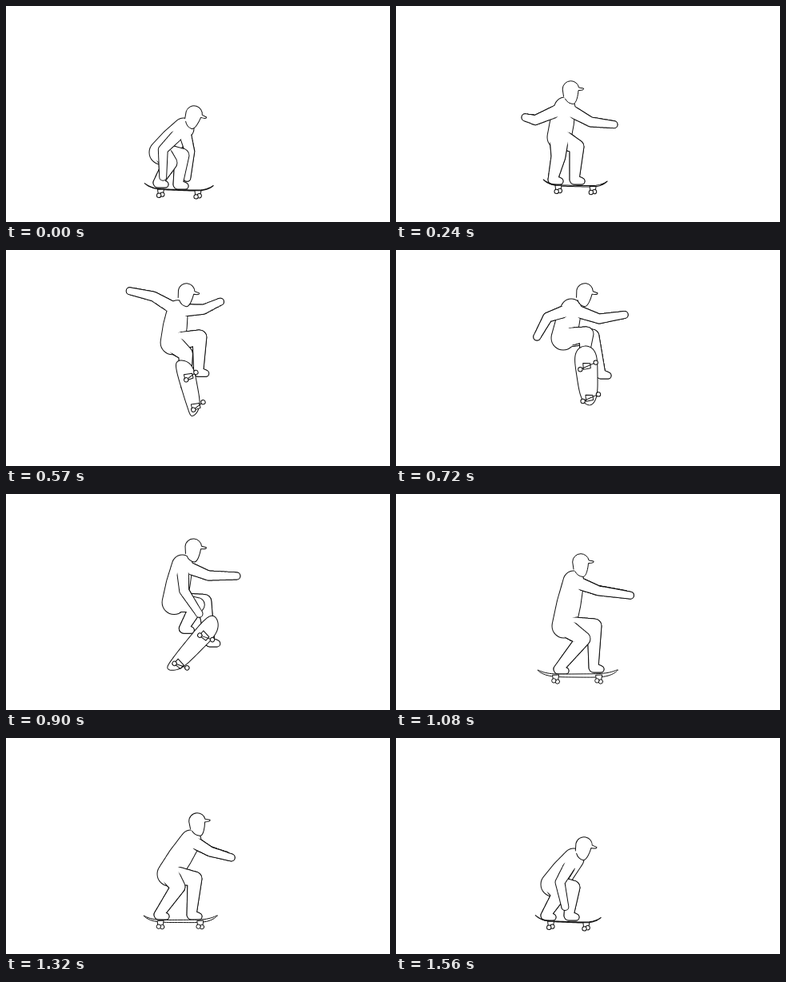
Recreate the animation shown at these times as an HTML page with a canvas. Size 480 px wide and 270 px high, loop 1.59 s.

```html
<!DOCTYPE html>
<html lang="en">
<head>
<meta charset="utf-8">
<title>Skater</title>
<style>
html, body { margin: 0; overflow: hidden; background: #fff; }
canvas { display: block; }
</style>
</head>
<body>
<canvas id="stage" width="480" height="270"></canvas>
<script>
const LOOP = 1590, STEP = 30, RAD = Math.PI / 180, INK = '#111', PAPER = '#fff';
const ctx = document.getElementById('stage').getContext('2d');

// Key poses. head: x, y, tilt. Arms: elbow and hand as angle and distance from the neck.
// Legs: knee and ankle. board: x, y, angle, half length, roll.
const poses = [
  { t: 0, head: [235, 135, 18], neck: [222, 153], hip: [194, 183],
    nearArm: [134, 37, 113, 66], farArm: [75, 30, 86, 62],
    nearLeg: [205, 196, 190, 221], farLeg: [220, 187, 215, 223], board: [216, 230, 2, 43, 2] },
  { t: 240, head: [218.5, 104, 0], neck: [211, 127], hip: [204, 164],
    nearArm: [157, 40, 166, 51], farArm: [29, 37, 19, 65],
    nearLeg: [203, 188, 196, 217], farLeg: [226, 176, 223, 217], board: [224, 225, 1.5, 40, 3] },
  { t: 450, head: [217, 61, 8], neck: [211, 86], hip: [207, 130],
    nearArm: [229, 38, 232, 71], farArm: [-14, 29, -20, 47],
    nearLeg: [212, 160, 211, 212], farLeg: [238, 122, 227, 163], board: [221, 194, -90, 36, 10] },
  { t: 720, head: [236, 52, 10], neck: [219, 74], hip: [209, 110],
    nearArm: [161, 31, 141, 55], farArm: [19, 37, 6, 67],
    nearLeg: [238, 105, 236, 130], farLeg: [245, 108, 256, 155], board: [239, 157, -94.7, 37, 90] },
  { t: 1080, head: [231, 85, 0], neck: [222, 109], hip: [210, 165],
    nearArm: [21, 33, 14, 73], farArm: [21, 31, 14, 66],
    nearLeg: [234, 181, 203, 219], farLeg: [248, 165, 247, 217], board: [227, 227, 0, 50, 9] },
  { t: 1320, head: [239, 104, -3], neck: [231, 128], hip: [204, 170],
    nearArm: [30, 28, 23, 55], farArm: [30, 26, 23, 48],
    nearLeg: [215, 186, 191, 221], farLeg: [236, 176, 232, 221], board: [218, 229, 0, 46, 7] },
  { t: 1560, head: [235, 134, 12], neck: [222, 151], hip: [196, 183],
    nearArm: [120, 34, 100, 61], farArm: [118, 30, 100, 54],
    nearLeg: [204, 195, 187, 222], farLeg: [221, 187, 216, 222], board: [215, 230, 2, 41, 2] },
];

// Hermite interpolation between the key poses.
function poseAt(t) {
  let i = 0;
  while (i < poses.length - 2 && poses[i + 1].t <= t) i++;
  const a = poses[i], b = poses[i + 1], before = poses[i - 1] || a, after = poses[i + 2] || b;
  const span = b.t - a.t, u = (t - a.t) / span;
  const blend = key => a[key].map((v, n) => {
    const w = b[key][n], d = w - v;
    const m0 = (w - before[key][n]) / (b.t - before.t) * span;
    const m1 = (after[key][n] - v) / (after.t - a.t) * span;
    return v + u * (m0 + u * (3 * d - 2 * m0 - m1 + u * (m0 + m1 - 2 * d)));
  });
  return Object.fromEntries(Object.keys(a).filter(k => k !== 't').map(k => [k, blend(k)]));
}

// Fills a chain of [x, y, radius] joints, grown by half a line for ink and shrunk for paper.
function fillLimb(joints, color, from = 0) {
  const grow = color === INK ? .5 : -.5, steps = 40;
  ctx.beginPath();
  for (let i = 0; i < joints.length - 1; i++) {
    for (let k = i ? 0 : from * steps; k <= steps; k++) {
      const [x, y, r] = joints[i].map((v, n) => v + (joints[i + 1][n] - v) * k / steps);
      ctx.moveTo(x + r + grow, y);
      ctx.arc(x, y, r + grow, 0, 2 * Math.PI);
    }
  }
  ctx.fillStyle = color;
  ctx.fill();
}

function drawBody({ neck, hip, nearArm, farArm, nearLeg, farLeg }) {
  const fromNeck = (angle, d, r) =>
    [neck[0] + d * Math.cos(angle * RAD), neck[1] + d * Math.sin(angle * RAD), r];
  const arm = ([a, d, b, e]) => [[...neck, 8], fromNeck(a, d, 6), fromNeck(b, e, 4.5)];
  const leg = ([kx, ky, x, y]) => [[...hip, 12], [kx, ky, 9], [x, y, 6], [x + 9, y + 2, 4]];
  const torso = [[...neck, 13], [(neck[0] + hip[0]) / 2, (neck[1] + hip[1]) / 2, 15], [...hip, 15]];
  const limbs = [arm(farArm), leg(farLeg), leg(nearLeg), arm(nearArm)];

  // One shared silhouette, then the inner edges from far to near.
  for (const color of [INK, PAPER]) [torso, ...limbs].forEach(l => fillLimb(l, color));
  for (const limb of limbs) {
    fillLimb(limb, INK, .4);
    fillLimb(limb, PAPER);
  }
}

function drawHead([x, y, tilt]) {
  ctx.save();
  ctx.translate(x, y);
  ctx.rotate(tilt * RAD);
  ctx.beginPath();
  ctx.moveTo(-9, 9);
  ctx.arc(0, 0, 10.3, Math.PI, -.2);
  ctx.lineTo(16, -1);
  ctx.quadraticCurveTo(17, 1.5, 9.5, 1.5);
  ctx.bezierCurveTo(9, 8, 7, 18, 3, 18.5);
  ctx.quadraticCurveTo(-4, 18, -7, 12);
  ctx.fillStyle = PAPER;
  ctx.fill();
  ctx.stroke();
  ctx.restore();
}

function shape(points) {
  ctx.beginPath();
  points.forEach(([x, y]) => ctx.lineTo(x, y));
  ctx.closePath();
  ctx.fill();
  ctx.stroke();
}

function drawBoard([x, y, angle, length, roll]) {
  const flat = Math.sin(roll * RAD), upright = Math.cos(roll * RAD);
  const drop = 2 + 5 * upright, side = 10 * flat - upright, skew = 2 + 1.5 * flat;
  ctx.save();
  ctx.translate(x, y);
  ctx.rotate(angle * RAD);
  ctx.fillStyle = PAPER;
  shape(Array.from({ length: 80 }, (_, i) => {
    const a = i / 40 * Math.PI, u = Math.cos(a);
    const edge = Math.sign(Math.sin(a)) * Math.sqrt(1 - u ** 4) * 13 * flat * (1 + .2 * u);
    return [length * u, edge - 7 * upright * Math.abs(u) ** 5];
  }));
  for (const end of [-1, 1]) {
    const mid = end * .54 * length - 9 * flat + 1, base = 4 * flat;
    shape([[mid - 4, -base], [mid - 3, drop - 1 + base], [mid + 3, drop - 1 + base], [mid + 4, -base]]);
    shape([[mid - skew, drop - side], [mid + skew, drop + side]]);
    for (const s of [1, -1]) {
      ctx.beginPath();
      ctx.arc(mid + s * skew, drop + s * side, 2.7, 0, 7);
      ctx.fill();
      ctx.stroke();
    }
  }
  ctx.restore();
}

ctx.lineJoin = ctx.lineCap = 'round';
ctx.strokeStyle = INK;

function draw() {
  const t = Math.floor(performance.now() % LOOP / STEP) * STEP;
  const pose = poseAt(t);
  ctx.fillStyle = PAPER;
  ctx.fillRect(0, 0, 480, 270);
  drawBody(pose);
  drawHead(pose.head);
  drawBoard(pose.board);
  requestAnimationFrame(draw);
}
draw();
</script>
</body>
</html>
```
